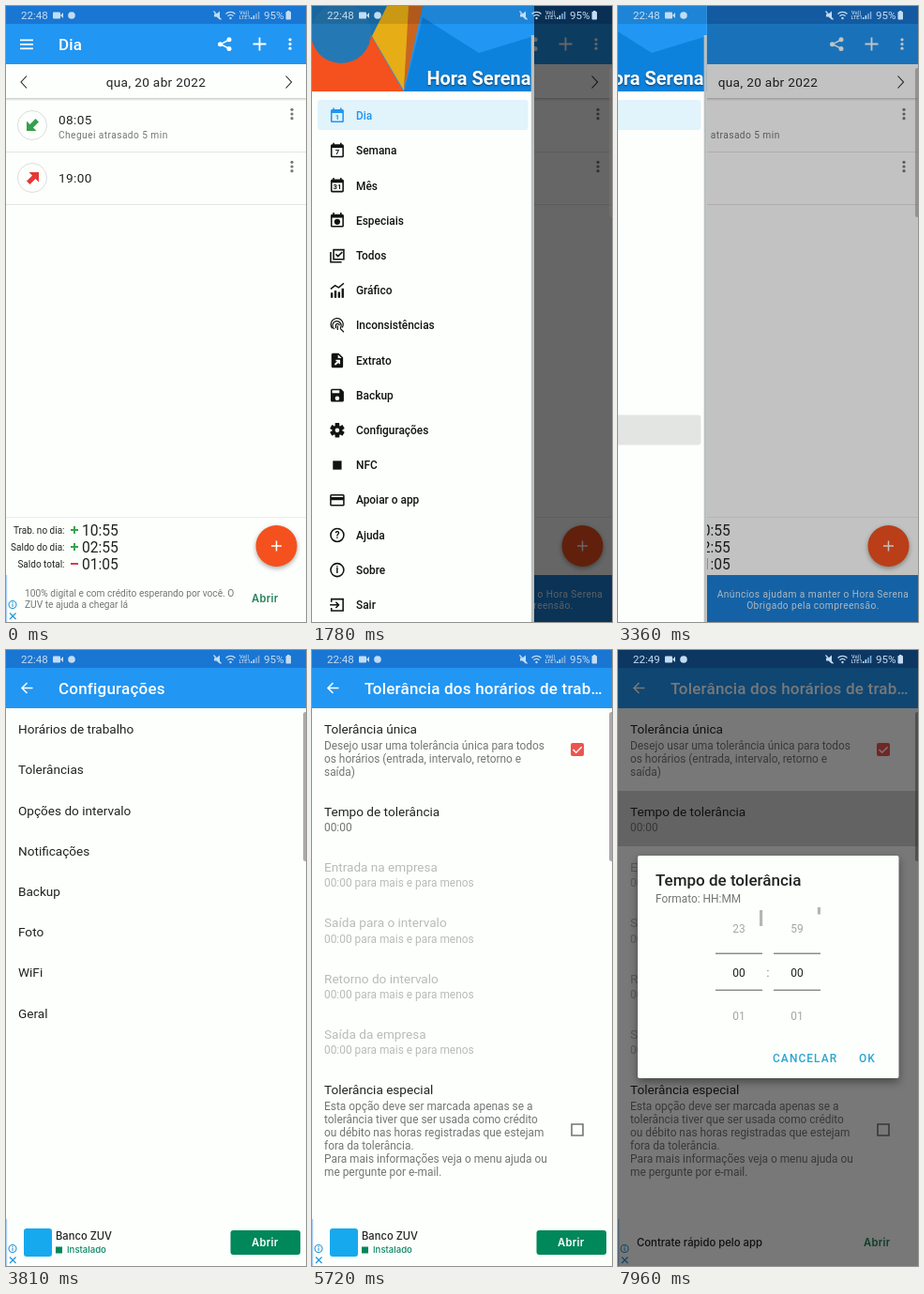
Recreate the animation shown at these times as an HTML page with a canvas. Size 320 by 656 pixels, loop 8 s.

```html
<!DOCTYPE html>
<html lang="pt-BR">
<head>
<meta charset="utf-8">
<title>Configurações de tolerância</title>
<style>
html, body { margin: 0; width: 100%; height: 100%; overflow: hidden; background: #fdfffd; }
canvas { display: block; width: 320px; height: 656px; }
</style>
</head>
<body>
<canvas id="stage"></canvas>
<script>
const W = 320, H = 656, LOOP = 8000;
const APP = 'Hora Serena', BANK = 'ZUV';
const BLUE = '#2196f3', BAR = '#1976d2', PAPER = '#fdfffd', INK = '#212322', GREY = '#747675';
const canvas = document.getElementById('stage');
const g = canvas.getContext('2d');
const dpr = window.devicePixelRatio || 1;
canvas.width = W * dpr;
canvas.height = H * dpr;

const clamp = v => Math.max(0, Math.min(1, v));
const span = (t, a, b) => clamp((t - a) / (b - a));
const easeOut = (p, n = 3) => 1 - Math.pow(1 - p, n);

function rect(x, y, w, h, color, r = 0) {
  g.fillStyle = color;
  g.beginPath();
  g.roundRect(x, y, w, h, r);
  g.fill();
}
function disc(x, y, r, color) {
  g.fillStyle = color;
  g.beginPath();
  g.arc(x, y, r, 0, 7);
  g.fill();
}
function poly(color, ...pts) {
  g.fillStyle = color;
  g.beginPath();
  for (let i = 0; i < pts.length; i += 2) g.lineTo(pts[i], pts[i + 1]);
  g.fill();
}
// y is the middle of the capitals
function text(s, x, y, size, color = INK, o = {}) {
  g.font = `${o.weight || 400} ${size}px ${o.font || 'Roboto'}, sans-serif`;
  g.letterSpacing = (o.ls || 0) + 'px';
  g.textAlign = o.align || 'left';
  g.fillStyle = color;
  g.fillText(s, x, y + size * 0.356);
}
const medium = { weight: 500 };
const adFont = { weight: 500, font: 'Inter' };

function group(x, y, scale, draw) {
  g.save();
  g.translate(x, y);
  g.scale(scale, scale);
  draw();
  g.restore();
}
function fill(d, color) {
  g.fillStyle = color;
  g.fill(new Path2D(d), 'evenodd');
}
function line(d, color, width = 2) {
  g.strokeStyle = color;
  g.lineWidth = width;
  g.stroke(new Path2D(d));
}
function fade(alpha, draw) {
  if (alpha <= 0) return;
  g.save();
  g.globalAlpha = alpha;
  draw();
  g.restore();
}

// Menu icons on a 24 unit grid
function calendar(c, label) {
  fill('M3 5a2 2 0 0 1 2-2h1V1h2v2h8V1h2v2h1a2 2 0 0 1 2 2v14a2 2 0 0 1-2 2H5a2 2 0 0 1-2-2zM5 8v11h14V8z', c);
  if (label) text(label, 12, 13.5, 10, c, { weight: 700, align: 'center' });
  else disc(12, 13.5, 4, c);
}
function ringed(c, label) {
  line('M3 12a9 9 0 1 0 18 0a9 9 0 1 0-18 0z', c);
  text(label, 12, 12, 13, c, { weight: 700, align: 'center' });
}
function gear(c) {
  line('M7 12a5 5 0 1 0 10 0a5 5 0 1 0-10 0z', c, 4);
  for (let i = 0; i < 6; i++) {
    g.save();
    g.translate(12, 12);
    g.rotate(i * Math.PI / 3 + Math.PI / 6);
    rect(6, -3, 4, 6, c, 0.8);
    g.restore();
  }
}
const menu = [
  ['Dia', c => calendar(c, '1')],
  ['Semana', c => calendar(c, '7')],
  ['Mês', c => calendar(c, '31')],
  ['Especiais', c => calendar(c)],
  ['Todos', c => line('M7 4h14v13H7zM3 7v14h15M10 10l3 3 6-6', c)],
  ['Gráfico', c => {
    fill('M3 15h3v7H3zM8 12h3v10H8zM13 14h3v8h-3zM18 9h3v13h-3z', c);
    line('M3 10l6-5 5 3 7-6', c);
  }],
  ['Inconsistências', c => line('M5 16a8.5 8.5 0 1 1 14-1M8 17a6 6 0 1 1 8-1M10 16v-4a2.5 2.5 0 1 1 5 0M12.5 12v6M16 16l5 5', c, 1.6)],
  ['Extrato', c => fill('M6 2h8l6 6v12a2 2 0 0 1-2 2H6a2 2 0 0 1-2-2V4a2 2 0 0 1 2-2zM13 4v5h5zM8 17l4-4h-2v-2h6v6h-2v-2l-4.5 4z', c)],
  ['Backup', c => fill('M5 3h12l4 4v12a2 2 0 0 1-2 2H5a2 2 0 0 1-2-2V5a2 2 0 0 1 2-2zM5 5v4h10V5zM9 16a3 3 0 1 0 6 0a3 3 0 1 0-6 0z', c)],
  ['Configurações', gear],
  ['NFC', c => rect(6, 6, 12, 12, c)],
  ['Apoiar o app', c => fill('M4 4h16a2 2 0 0 1 2 2v12a2 2 0 0 1-2 2H4a2 2 0 0 1-2-2V6a2 2 0 0 1 2-2zM4 6v2h16V6zM4 12v6h16v-6z', c)],
  ['Ajuda', c => ringed(c, '?')],
  ['Sobre', c => ringed(c, 'i')],
  ['Sair', c => line('M4 8V4h16v16H4v-4M2 12h12M10 8l4 4-4 4', c)]
];

function dots(x, y, color) {
  for (let i = -1; i <= 1; i++) disc(x, y + i * 4.7, 1.6, color);
}

function statusIcons(t) {
  const c = '#c3dcf3';
  text(t < 6610 ? '22:48' : '22:49', 16, 10, 11.6, c);
  rect(50, 6.5, 8, 7, c, 1);
  poly(c, 58, 10, 61, 7, 61, 13);
  disc(70, 10, 3.8, c);
  fill('M222 8.5h2.5l3.5-3v9l-3.5-3H222z', c);
  line('M221.5 5.5l8 9', c, 1.2);
  line('M234.5 8.5a7 7 0 0 1 10 0M236.5 10.8a4 4 0 0 1 6 0', c, 1.3);
  disc(239.5, 13, 1.2, c);
  text('Vo))', 249, 7, 5.5, c, medium);
  text('LTE1', 248.5, 12.5, 5.5, c, medium);
  for (let i = 0; i < 4; i++) rect(261 + i * 2.6, 12 - i * 2, 1.5, 2 + i * 2, i < 2 ? c : '#7fb1e2');
  text('95%', 275, 10, 11.6, c);
  rect(298.5, 6, 5.5, 8.5, c, 0.8);
  rect(300, 5, 2.5, 1.5, c);
}

function toolbar(title) {
  rect(0, 0, W, 19, BAR);
  rect(0, 19, W, 43, BLUE);
  text(title, 56, 41, 17, '#fff', { weight: 500, ls: 0.2 });
}
function backArrow() {
  line('M28.5 40.5H17M22.5 35l-5.5 5.5 5.5 5.5', '#fff', 1.6);
}

function adMarks() {
  rect(0, 606, 1.2, 50, '#a9cdf5');
  line('M3 637.5a4 4 0 1 0 8 0a4 4 0 1 0-8 0zM7 636.8v3', '#2095d8', 1.1);
  rect(6.4, 634.8, 1.2, 1.2, '#2095d8');
  line('M4 646.5l6.5 6.5M10.5 646.5l-6.5 6.5', '#2095d8', 1.2);
}
function openLabel(color) {
  text('Abrir', 262, 631, 11.2, color, { ...adFont, weight: 600, ls: 0.3 });
}
function adCredit() {
  rect(0, 606, W, 50, PAPER);
  text('100% digital e com crédito esperando por você. O', 20, 625, 10.2, GREY);
  text(BANK + ' te ajuda a chegar lá', 20, 637, 10.2, GREY);
  openLabel('#238158');
  adMarks();
}
function adHouse() {
  rect(0, 606, W, 50, '#1a80d8');
  const o = { ls: 0.43, align: 'center' };
  text('Anúncios ajudam a manter o ' + APP, 208, 626, 10.2, '#e5f1fb', o);
  text('Obrigado pela compreensão.', 208, 638, 10.2, '#e5f1fb', o);
}
function adBank() {
  rect(0, 606, W, 50, PAPER);
  rect(19, 616, 30, 30, '#16a9ee', 3);
  text('Banco ' + BANK, 53, 624, 11.2, INK, adFont);
  rect(53, 635.5, 7, 7, '#00875a');
  text('Instalado', 65, 639, 9.6, '#0b8563', adFont);
  rect(239.5, 618, 74.5, 26, '#00875a', 3);
  openLabel('#fff');
  adMarks();
}
function adHire(t) {
  rect(0, 606, W, 50, PAPER);
  text('Contrate rápido pelo app', 20, 631, 11.3, INK, adFont);
  openLabel(t < 7510 ? '#1769b0' : '#238158');
  adMarks();
}

function entry(y, time, note, color, turn) {
  line(`M12.5 ${y}a15.5 15.5 0 1 0 31 0a15.5 15.5 0 1 0-31 0z`, '#dcdedc', 1);
  g.save();
  g.translate(28.5, y);
  g.rotate(turn);
  fill('M-4-6H6.5V4.5L3 1-3 7-6.5 3.5-.5-2.5z', color);
  g.restore();
  text(time, 56, note ? y - 6 : y + 0.5, 13.6, INK, { ls: 0.4 });
  if (note) text(note, 56, y + 10, 10.2, GREY, { ls: 0.43 });
  dots(305, y - 12, '#777977');
  rect(0, y + 28, W, 1, '#e3e5e3');
}
function home() {
  rect(0, 0, W, H, PAPER);
  toolbar('Dia');
  for (let i = 0; i < 3; i++) rect(15, 35.5 + i * 4.5, 14, 1.7, '#fff');
  line('M238 36l-9 4.7 9 4.7', '#fff', 1.5);
  disc(238, 35.8, 2.5, '#fff');
  disc(228.5, 40.7, 2.5, '#fff');
  disc(238, 45.6, 2.5, '#fff');
  line('M263.5 40.5h14M270.5 33.5v14', '#fff', 1.8);
  dots(303, 40.5, '#fff');

  line('M22 74.5l-6 6.5 6 6.5M298.5 74.5l6 6.5-6 6.5', INK, 1.1);
  text('qua, 20 abr 2022', 160, 81, 13.6, INK, { ls: 0.36, align: 'center' });
  rect(0, 98, W, 1, '#cfd1cf');
  rect(0, 99, W, 1.5, '#e6e8e6');
  entry(127, '08:05', 'Cheguei atrasado 5 min', '#34a04c', Math.PI);
  entry(183, '19:00', '', '#e53935', 0);

  rect(0, 544, W, 1, '#eceeec');
  [['Trab. no dia:', '10:55'], ['Saldo do dia:', '02:55'], ['Saldo total:', '01:05']].forEach(([name, sum], i) => {
    const y = 558 + i * 18;
    text(name, 62.5, y, 10, INK, { align: 'right' });
    line(i < 2 ? `M69 ${y}h8M73 ${y - 4}v8` : `M69 ${y}h8`, i < 2 ? '#35a24b' : '#d8304e', 1.9);
    text(sum, 81, y, 15.6);
  });
  g.save();
  g.shadowColor = 'rgba(0,0,0,.35)';
  g.shadowBlur = 5 * dpr;
  g.shadowOffsetY = 2 * dpr;
  disc(288.5, 575, 22, '#f4511e');
  g.restore();
  line('M283 575h11M288.5 569.5v11', '#fff', 1.5);
}
function homeAd(t) {
  adCredit();
  if (t >= 100) fade(span(t, 50, 200), adHouse);
}

function drawer(t, edge) {
  g.save();
  g.translate(edge - 237, 0);
  rect(0, 0, 237, H, PAPER);

  g.save();
  g.beginPath();
  g.rect(0, 0, 237, 91);
  g.clip();
  rect(0, 0, 237, 92, BLUE);
  poly('#0d82dc', 98, 92, 118, 12, 178, 50, 237, 32, 237, 92);
  poly('#1a74b5', 0, 0, 84, 0, 66, 34, 0, 36);
  poly('#f4511e', 0, 34, 60, 26, 98, 92, 0, 92);
  poly('#e6ad16', 80, 0, 104, 0, 98, 90, 64, 32);
  poly('#c9651f', 103, 0, 118, 0, 98, 90);
  disc(31, 29, 32, '#2479b4');
  rect(0, 0, 237, 19, 'rgba(0,0,0,.12)');
  g.shadowColor = 'rgba(0,0,0,.5)';
  g.shadowBlur = 2 * dpr;
  g.shadowOffsetY = dpr;
  text(APP, 233.5, 77, 20, '#fff', { weight: 700, align: 'right' });
  g.restore();

  rect(6, 100, 224.5, 32, '#e1f3fb', 3);
  const press = span(t, 3160, 3300);
  if (press > 0) rect(6, 435.5, 224.5, 32, `rgba(0,0,0,${0.1 * press})`, 3);
  menu.forEach(([name, icon], i) => {
    const y = 117 + i * 37.2, c = i ? '#111312' : BLUE;
    group(17.6, y - 9.3, 0.777, () => icon(c));
    text(name, 47, y, 11.9, c, medium);
  });
  rect(233.8, 31, 3.2, H - 31, '#bcbfbe');
  g.restore();
}

function settings(t) {
  rect(0, 62, W, H - 62, PAPER);
  const press = span(t, 5200, 5300);
  if (press > 0) rect(0, 106.5, W, 43, `rgba(0,0,0,${0.1 * press})`);
  ['Horários de trabalho', 'Tolerâncias', 'Opções do intervalo', 'Notificações', 'Backup', 'Foto', 'WiFi', 'Geral']
    .forEach((s, i) => text(s, 13, 84.4 + i * 43.2, 13.6));
}

function lines(y, ...rows) {
  rows.forEach((s, i) => text(s, 13, y + i * 13.95, 11.9, GREY));
}
function tolerance(t) {
  rect(0, 62, W, H - 62, PAPER);
  const press = span(t, 7510, 7650);
  if (press > 0) rect(0, 150, W, 59, `rgba(0,0,0,${0.17 * press})`);
  text('Tolerância única', 13, 84.4, 13.6);
  lines(101.5, 'Desejo usar uma tolerância única para todos', 'os horários (entrada, intervalo, retorno e', 'saída)');
  rect(276, 99, 14, 14, '#ef5350', 2);
  line('M278.5 106l3.2 3.2 6-6', '#fff', 1.5);
  text('Tempo de tolerância', 13, 171.7, 13.6);
  lines(188.7, '00:00');
  ['Entrada na empresa', 'Saída para o intervalo', 'Retorno do intervalo', 'Saída da empresa'].forEach((s, i) => {
    const y = 231.2 + i * 59.4;
    text(s, 13, y, 13.6, '#b9bbb9');
    text('00:00 para mais e para menos', 13, y + 16.8, 11.9, '#b9bbb9');
  });
  text('Tolerância especial', 13, 468.2, 13.6);
  lines(485.7, 'Esta opção deve ser marcada apenas se a', 'tolerância tiver que ser usada como crédito',
    'ou débito nas horas registradas que estejam', 'fora da tolerância.',
    'Para mais informações veja o menu ajuda ou', 'me pergunte por e-mail.');
  line('M277 505h12v12h-12z', '#747675', 1.6);

  // edge glow when the list is pulled past its end
  const pull = easeOut(span(t, 6700, 7150)) * (1 - span(t, 7220, 7410));
  if (pull > 0) {
    g.save();
    g.beginPath();
    g.rect(0, 500, W, 106);
    g.clip();
    disc(153, 867 - 33 * pull, 261, `rgba(33,150,220,${0.13 * Math.min(1, pull * 1.5)})`);
    g.restore();
  }
}

function dialog(t) {
  const p = easeOut(span(t, 7680, 7900));
  if (!p) return;
  rect(0, 0, W, H, `rgba(0,0,0,${0.53 * p})`);
  fade(p, () => {
    const s = 0.92 + 0.08 * p;
    group(160 * (1 - s), 337.5 * (1 - s), s, () => {
      g.save();
      g.shadowColor = 'rgba(0,0,0,.4)';
      g.shadowBlur = 10 * dpr;
      g.shadowOffsetY = 4 * dpr;
      rect(21, 219, 278.5, 237, PAPER, 2);
      g.restore();
      text('Tempo de tolerância', 40, 245, 17, INK, medium);
      text('Formato: HH:MM', 40, 264.5, 11.9, GREY);
      const mid = { align: 'center' };
      [[129, '23'], [191, '59']].forEach(([x, prev]) => {
        text(prev, x, 297, 11.9, '#a4a6a4', mid);
        text('00', x, 343.5, 11.9, INK, mid);
        text('01', x, 390, 11.9, '#a4a6a4', mid);
        rect(x - 25, 322.5, 50, 1.6, '#8d8f8d');
        rect(x - 25, 361.5, 50, 1.6, '#8d8f8d');
      });
      text(':', 160, 343.5, 11.9, GREY, mid);
      rect(151, 277, 3.2, 17, '#b5b7b5');
      rect(212.8, 274, 3.2, 7.5, '#b5b7b5');
      const button = { weight: 500, ls: 1.1 };
      text('CANCELAR', 165, 435, 11.9, '#2ba5d2', button);
      text('OK', 257, 435, 11.9, '#2ba5d2', button);
    });
  });
}

// A new page slides in from the right while it fades in
function enter(p, title, page, t) {
  if (!p) return;
  const e = easeOut(p);
  fade(e, () => {
    g.translate(40 * (1 - e), 0);
    toolbar(title);
    backArrow();
    page(t);
  });
}

function drawerEdge(t) {
  if (t < 1350) return 0;
  if (t < 3290) return 237 * easeOut(span(t, 1273, 1780), 5);
  return 237 * (1 - easeOut(span(t, 3290, 3560)));
}

function draw(t) {
  g.setTransform(dpr, 0, 0, dpr, 0, 0);
  if (t < 3810) {
    home();
    homeAd(t);
    const edge = drawerEdge(t);
    if (edge > 0) {
      rect(0, 0, W, H, `rgba(0,0,0,${0.6 * edge / 237})`);
      drawer(t, edge);
    }
  }
  const opened = span(t, 3450, 3780);
  if (t < 5570) enter(opened, 'Configurações', settings, t);
  enter(span(t, 5270, 5570), 'Tolerância dos horários de trab…', tolerance, t);
  fade(opened, () => {
    adBank();
    fade(span(t, 6610, 6860), () => adHire(t));
  });
  if (t >= 700) rect(317, 66, 6, 159, 'rgba(125,112,114,.6)', 2.5);
  dialog(t);
  statusIcons(t);
}

function tick(now) {
  draw(now % LOOP);
  requestAnimationFrame(tick);
}
requestAnimationFrame(tick);
</script>
</body>
</html>
```
